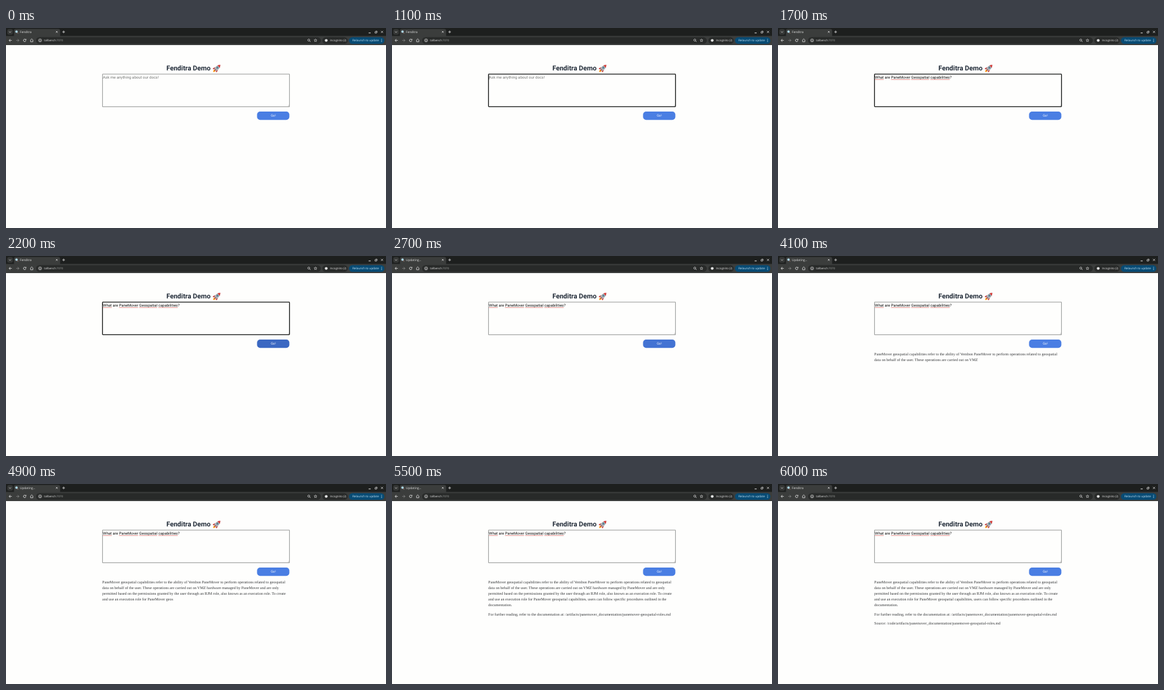
These frames come from a looping animation (600x316 px, 7 s). An HTML page with a canvas:

```html
<!DOCTYPE html>
<html lang="en">
<head>
<meta charset="utf-8">
<title>Fenditra</title>
<style>
html, body { margin: 0; width: 100%; height: 100%; overflow: hidden; background: #fefefd; }
canvas { display: block; }
</style>
</head>
<body>
<canvas id="stage" width="600" height="316"></canvas>
<script>
const ctx = document.getElementById('stage').getContext('2d');
const LOOP = 7000, TICK = 100;
const UI = '"Open Sans", "Noto Sans", sans-serif';
const SANS = 'Roboto, sans-serif';
const SERIF = '"Liberation Serif", serif';
const LIGHT = '#e3e3e3';

const TIMES = { focus: 900, paste: 1200, spellcheck: 1300, caretOff: 1700, submit: 2400, done: 6000 };
const QUERY = 'What are PaneMover Geospatial capabilities?';
const MISSPELT = ['What', 'PaneMover', 'Geospatial', 'capabilities'];
const ANSWER = [
  [157.1, 'PaneMover geospatial capabilities refer to the ability of Vembon PaneMover to perform operations related to geospatial'],
  [166.1, 'data on behalf of the user. These operations are carried out on VMZ hardware managed by PaneMover and are only'],
  [175.1, 'permitted based on the permissions granted by the user through an RJM role, also known as an execution role. To create'],
  [184.1, 'and use an execution role for PaneMover geospatial capabilities, users can follow specific procedures outlined in the'],
  [193.1, 'documentation.'],
  [207.7, 'For further reading, refer to the documentation at: /artifacts/panemover_documentation/panemover-geospatial-roles.md'],
  [222.2, 'Source: /code/artifacts/panemover_documentation/panemover-geospatial-roles.md']
];
// [time, characters streamed so far]
const STREAM = [[3400, 0], [3500, 12], [3600, 12], [4100, 185], [4900, 390], [5100, 493],
  [5200, 493], [5300, 567], [5400, 567], [5800, 670]];

const ramp = (t, from, to) => Math.min(1, Math.max(0, (t - from) / (to - from)));

function streamed(t) {
  let count = 0;
  for (let i = 1; i < STREAM.length; i++) {
    const [t0, n0] = STREAM[i - 1], [t1, n1] = STREAM[i];
    if (t >= t0) count = n0 + (n1 - n0) * ramp(t, t0, t1);
  }
  return Math.round(count);
}

function text(str, x, y, size, family, color, weight = 400) {
  ctx.font = `${weight} ${size}px ${family}`;
  ctx.fillStyle = color;
  ctx.fillText(str, x, y);
  return ctx.measureText(str).width;
}

function box(x, y, w, h, r, color) {
  ctx.fillStyle = color;
  ctx.beginPath();
  ctx.roundRect(x, y, w, h, r);
  ctx.fill();
}

function line(points, color = LIGHT, width = 0.8, close = false) {
  ctx.strokeStyle = color;
  ctx.lineWidth = width;
  ctx.beginPath();
  points.forEach(([x, y]) => ctx.lineTo(x, y));
  if (close) ctx.closePath();
  ctx.stroke();
}

function ring(x, y, r, color = LIGHT, width = 0.7, from = 0, to = 2 * Math.PI) {
  ctx.strokeStyle = color;
  ctx.lineWidth = width;
  ctx.beginPath();
  ctx.arc(x, y, r, from, to);
  ctx.stroke();
}

function dot(x, y, r, color = LIGHT) {
  ctx.fillStyle = color;
  ctx.beginPath();
  ctx.arc(x, y, r, 0, 2 * Math.PI);
  ctx.fill();
}

function cross(x, y, r) {
  line([[x - r, y - r], [x + r, y + r]]);
  line([[x - r, y + r], [x + r, y - r]]);
}

function arrow(x, y, dir, color) {
  line([[x - 2.2 * dir, y], [x + 2.2 * dir, y]], color);
  line([[x, y - 2.1], [x + 2.2 * dir, y], [x, y + 2.1]], color);
}

function tabStrip(loading) {
  box(0, 0, 600, 13, 0, '#1d1f1e');
  box(2, 1.8, 8.8, 8.8, 2.6, '#363837');
  line([[4.9, 5.6], [6.4, 7.1], [7.9, 5.6]]);
  box(12.5, 1.5, 73, 13, 3, '#3b3d3c');
  line([[17.6, 6.9], [19.3, 8.7]], '#8d6e63', 1.2);
  dot(16.6, 5.7, 1.8, '#b3e5fc');
  ring(16.6, 5.7, 1.8, '#90a4ae');
  text(loading ? 'Updating...' : 'Fenditra', 22, 8.1, 4.8, UI, LIGHT);
  cross(80.2, 6.2, 1.3);
  line([[88.9, 6.2], [93.1, 6.2]]);
  line([[91, 4.1], [91, 8.3]]);
  line([[572.6, 7.8], [575.8, 7.8]], LIGHT, 1);
  line([[582.7, 5.8], [585.2, 5.8], [585.2, 8.1], [582.7, 8.1]], LIGHT, 0.7, true);
  line([[583.6, 4.9], [586, 4.9], [586, 7.2]], LIGHT, 0.6);
  cross(593.7, 6.2, 1.6);
}

function toolbar() {
  const y = 19.6;
  box(0, 12.6, 600, 14.4, 0, '#3b3d3c');
  arrow(7, y, -1, LIGHT);
  arrow(18.4, y, 1, '#858786');
  ring(29.5, y, 2, LIGHT, 0.8, 0.3, 5.5);
  line([[31.7, 17.3], [31.7, 19], [30, 19]]);
  line([[38.8, 21.8], [38.8, 18.8], [40.6, 17.2], [42.4, 18.8], [42.4, 21.8]], LIGHT, 0.8, true);

  box(47.5, 14.4, 449.5, 10.6, 5.3, '#282a29');
  dot(53.8, y, 3.8, '#3b3d3c');
  ring(53.8, y, 2.1);
  line([[53.8, 19.3], [53.8, 20.8]], LIGHT, 0.6);
  const hostWidth = text('tallbench', 60, 21.3, 4.4, UI, LIGHT);
  text(':7070', 60 + hostWidth, 21.3, 4.4, UI, '#a4a6a5');
  ring(478.1, 19.1, 1.6);
  line([[479.3, 20.3], [480.9, 21.9]]);
  const star = Array.from({ length: 10 }, (_, i) => {
    const r = i % 2 ? 1.1 : 2.4, a = i * Math.PI / 5 - Math.PI / 2;
    return [488.7 + r * Math.cos(a), y + r * Math.sin(a)];
  });
  line(star, LIGHT, 0.6, true);

  box(499.5, 14.4, 40, 10.6, 5.3, '#282a29');
  dot(505.6, y, 2.2);
  text('Incognito (2)', 511.5, 21.3, 4.5, UI, LIGHT);
  box(541.5, 14.4, 56, 10.6, 5.3, '#084b74');
  text('Relaunch to update', 547, 21.3, 4.6, UI, '#c6e7fb');
  [-1.8, 0, 1.8].forEach(dy => dot(593, y + dy, 0.55, '#c6e7fb'));
}

function shape(path, color) {
  ctx.fillStyle = color;
  ctx.fill(new Path2D(path));
}

function rocket(x, y) {
  ctx.save();
  ctx.translate(x, y);
  ctx.rotate(Math.PI / 4);
  shape('M-1.5 4 Q-2.2 6 0 8.2 Q2.2 6 1.5 4Z', '#fb9a1c');
  shape('M-1.8 0 Q-4.6 1.6 -4 5.2 L-1.4 3.6Z M1.8 0 Q4.6 1.6 4 5.2 L1.4 3.6Z', '#c62f2f');
  shape('M0 -8 Q5 -2.5 1.8 4.2 H-1.8 Q-5 -2.5 0 -8Z', '#a9b4ba');
  shape('M0 -8 Q2 -5.8 2.6 -3.8 Q0 -4.8 -2.6 -3.8 Q-2 -5.8 0 -8Z', '#d83a36');
  dot(0, -1.4, 1.4, '#37474f');
  dot(0, -1.4, 0.8, '#5fb4e0');
  shape('M-.5 1.8 H.5 V5 H-.5Z', '#b62b2b');
  ctx.restore();
}

function squiggle(x, y, width) {
  const points = [];
  for (let d = 0; d <= width; d += 0.6) points.push([x + d, y + 0.35 * Math.cos(d / 0.6 * Math.PI)]);
  line(points, '#d8504a', 0.6);
}

function questionBox(t) {
  const focused = t >= TIMES.focus && t < TIMES.submit;
  const pasted = t >= TIMES.paste;
  const x = 153.1, y = 80.3, size = 6.04;

  ctx.strokeStyle = focused ? '#151716' : '#8c8e8d';
  ctx.lineWidth = focused ? 1.3 : 0.9;
  ctx.beginPath();
  ctx.roundRect(152.4, 72.9, 295.2, 51.5, focused ? 0.8 : 0);
  ctx.stroke();
  line([[444.9, 123.6], [447, 121.5]], '#888', 0.4);
  line([[446.2, 123.6], [447, 122.8]], '#888', 0.4);

  const width = pasted ? text(QUERY, x, y, size, SANS, '#111')
                       : text('Ask me anything about our docs!', x, y, size, SANS, '#757776');
  if (t >= TIMES.spellcheck) {
    MISSPELT.forEach(word => {
      const start = ctx.measureText(QUERY.slice(0, QUERY.indexOf(word))).width;
      squiggle(x + start, 81.5, ctx.measureText(word).width);
    });
  }
  if (focused && t < TIMES.caretOff) {
    const caret = x + (pasted ? width : 0);
    line([[caret, 75], [caret, 81.8]], '#222', 0.5);
  }
}

function goButton(t) {
  const hover = ramp(t, 1900, 2200) - ramp(t, 2500, 2900);
  const mix = (a, b) => Math.round(a + (b - a) * hover);
  box(396.4, 132, 51, 13.2, 4.8, `rgb(${mix(74, 59)}, ${mix(126, 104)}, ${mix(227, 194)})`);
  ctx.textAlign = 'center';
  text('Go!', 421.9, 140.2, 5, SANS, '#fff');
  ctx.textAlign = 'left';
}

function answer(t) {
  let left = streamed(t);
  for (const [y, str] of ANSWER) {
    if (left <= 0) break;
    text(str.slice(0, left), 152.1, y, 6.04, SERIF, '#303234');
    left -= str.length;
  }
}

function render(now) {
  const t = Math.floor(now % LOOP / TICK) * TICK;
  ctx.textRendering = 'geometricPrecision';
  box(0, 0, 600, 316, 0, '#fefefd');
  tabStrip(t >= TIMES.submit && t < TIMES.done);
  toolbar();
  text('Fenditra Demo', 253.2, 67.3, 10.64, SANS, '#212b38', 700);
  rocket(332.8, 63.8);
  questionBox(t);
  goButton(t);
  answer(t);
}

const start = performance.now();
function loop() {
  render(performance.now() - start);
  requestAnimationFrame(loop);
}
loop();
</script>
</body>
</html>
```
